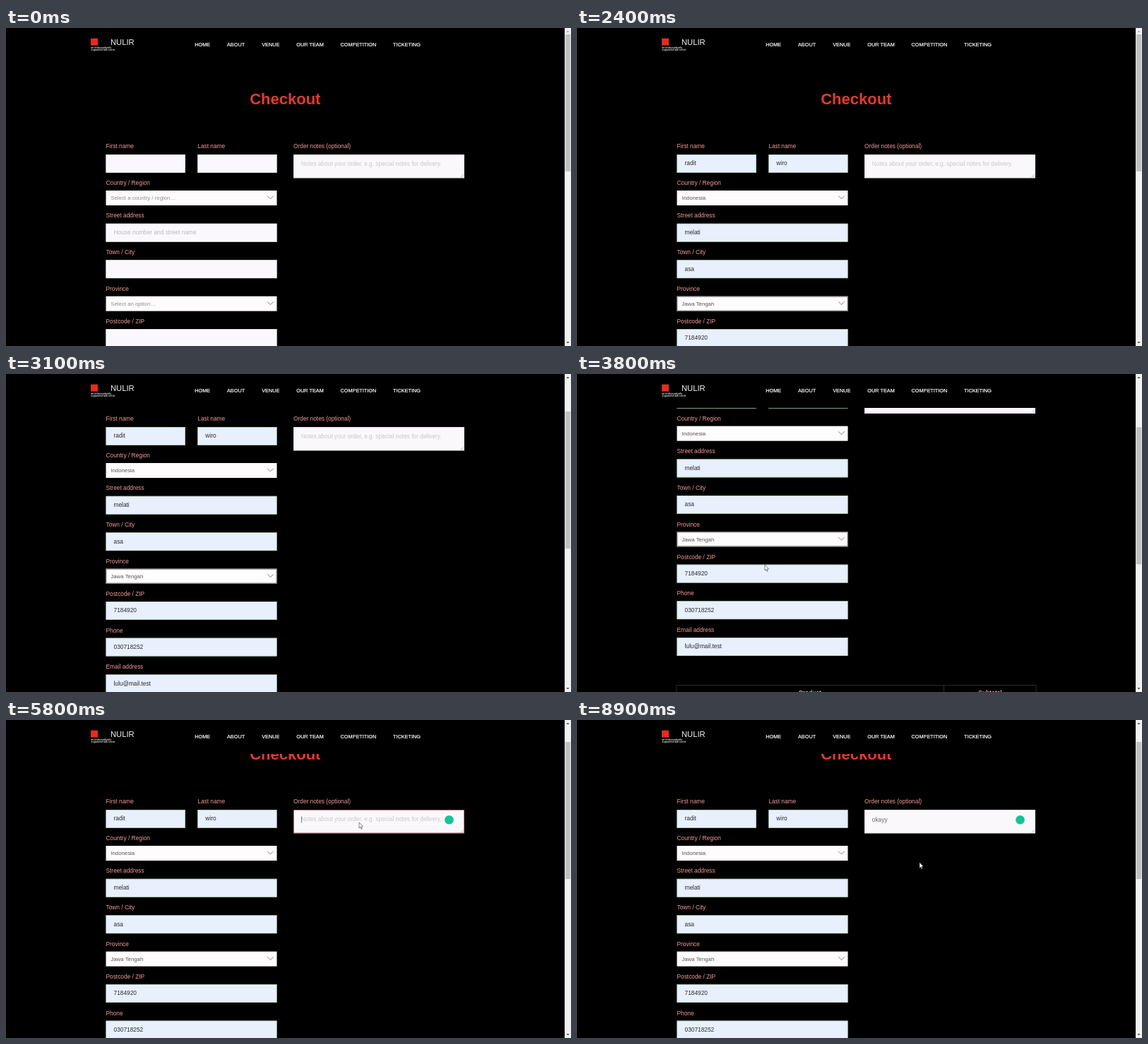
An HTML page with a canvas for the animation above (9 s loop, 800 px wide and 450 px high).

```html
<!DOCTYPE html>
<html lang="en">
<head>
<meta charset="utf-8">
<title>Checkout</title>
<style>
html, body { margin: 0; width: 100%; height: 100%; overflow: hidden; background: #000; }
canvas { display: block; width: 800px; height: 450px; }
</style>
</head>
<body>
<canvas id="stage" width="800" height="450"></canvas>
<script>
const ctx = document.getElementById('stage').getContext('2d');
const LOOP = 9000, STEP = 100;
const FILL = 1500, PROVINCE = 2100, NOTES = 5700, BLUR = 8600;
const FONT = '"Liberation Sans", Arial, sans-serif';
const PINK = '#f09a94', RED = '#e23a30';

// Wheel notches: start time and scroll position reached.
const NOTCHES = [[2550, 52], [2700, 104], [3250, 156.3], [4250, 104], [4689, 52]];
const KEYS = [6600, 6800, 7000, 7300, 7500];
const PATHS = [
  { end: 6600, points: [[3600, 262, 284], [3800, 266, 270], [4300, 330, 251], [4800, 370, 229], [5600, 500, 145]] },
  { end: LOOP, points: [[8100, 500, 145], [8500, 485, 201.5]] }
];
const NAV = [['HOME', 267.3], ['ABOUT', 313], ['VENUE', 362.2], ['OUR TEAM', 411.3],
  ['COMPETITION', 473.6], ['TICKETING', 548]];
// label, x, label centre, box top, width, value, placeholder
const FIELDS = [
  ['First name', 141.5, 167.5, 179, 112.3, 'radit', ''],
  ['Last name', 271.3, 167.5, 179, 112.2, 'wiro', ''],
  ['Street address', 141.5, 265.5, 276.8, 242, 'melati', 'House number and street name'],
  ['Town / City', 141.5, 317.2, 328.3, 242, 'asa', ''],
  ['Postcode / ZIP', 141.5, 415, 426, 242, '7184920', ''],
  ['Phone', 141.5, 466.7, 477.6, 242, '030718252', ''],
  ['Email address', 141.5, 518.5, 529.3, 242, 'lulu@mail.test', '']
];

const clamp = v => Math.max(0, Math.min(1, v));

function text(str, x, mid, size, color, weight = '', align = 'left') {
  ctx.font = `${weight} ${size}px ${FONT}`;
  ctx.textAlign = align;
  ctx.fillStyle = color;
  ctx.fillText(str, x, mid + size * 0.35);
}

function rect(x, y, w, h, color) {
  ctx.fillStyle = color;
  ctx.fillRect(x, y, w, h);
}

function frame(x, y, w, h, color, line) {
  ctx.strokeStyle = color;
  ctx.lineWidth = line;
  ctx.strokeRect(x + line / 2, y + line / 2, w - line, h - line);
}

function poly(points, color) {
  ctx.beginPath();
  points.forEach(([x, y]) => ctx.lineTo(x, y));
  ctx.closePath();
  ctx.fillStyle = color;
  ctx.fill();
}

function scrollAt(t) {
  return NOTCHES.reduce((pos, [start, to]) => {
    const p = clamp((t - start) / 200);
    return pos + (to - pos) * (1 - (1 - p) ** 3);
  }, 0);
}

function drawField([label, x, mid, top, w, value, hint], filled) {
  text(label, x, mid, 8.33, PINK);
  rect(x, top, w, 25.8, filled ? '#e8f0fe' : '#faf8fc');
  frame(x, top, w, 25.8, filled ? '#9bbd8e' : '#dfe3df', 0.6);
  const tone = filled ? '#2b2b2b' : '#bdbbbf';
  text(filled ? value : hint, x + 11, top + 12.5, 8.33, tone);
}

function drawSelect(label, mid, top, value, set, focus) {
  text(label, 141.5, mid, 8.33, PINK);
  rect(141.5, top, 242, 21, '#fefcfd');
  if (focus) frame(141, top - 0.4, 243, 21.8, '#77747a', 1.4);
  text(value, 148.3, top + 10.5, 7.8, set ? '#555' : '#8d8b8e');
  ctx.beginPath();
  ctx.moveTo(370, top + 7.6);
  ctx.lineTo(374.4, top + 12);
  ctx.lineTo(378.8, top + 7.6);
  ctx.strokeStyle = '#77757a';
  ctx.lineWidth = 0.9;
  ctx.stroke();
}

function drawNotes(t) {
  const focus = t >= NOTES && t < BLUR;
  const count = KEYS.filter(k => t >= k).length;
  text('Order notes (optional)', 407, 167.5, 8.33, PINK);
  rect(407, 179, 242, 33.3, '#faf8fb');
  frame(407, 179, 242, 33.3, focus ? '#a8453f' : '#e2dfe3', 0.7);
  ctx.beginPath();
  for (const d of [2, 4.5]) {
    ctx.moveTo(648 - d, 211.3);
    ctx.lineTo(648, 211.3 - d);
  }
  ctx.strokeStyle = '#8a888c';
  ctx.lineWidth = 0.5;
  ctx.stroke();
  if (count) text('okayy'.slice(0, count), 417.8, 193, 8.33, '#6b696d');
  else text('Notes about your order, e.g. special notes for delivery.', 417.8, 191.6, 8.33, '#c9c7cb');
  if (!focus && t < NOTES) return;
  const last = count ? KEYS[count - 1] : NOTES;
  if (focus && (t - last) % 1060 < 530) {
    ctx.font = `8.33px ${FONT}`;
    rect(418 + ctx.measureText('okayy'.slice(0, count)).width, 188.5, 0.7, 9, '#444');
  }
  ctx.beginPath();
  ctx.arc(627.5, 193.2, 6.3, 0, Math.PI * 2);
  ctx.fillStyle = '#15c39a';
  ctx.fill();
}

function drawTable() {
  frame(140.5, 596.5, 510, 40, '#333', 0.8);
  rect(519.2, 596.5, 0.8, 40, '#333');
  text('Product', 330, 607.5, 8.33, PINK, 'bold', 'center');
  text('Subtotal', 585, 607.5, 8.33, PINK, 'bold', 'center');
}

function drawPage(t) {
  const filled = t >= FILL;
  text('Checkout', 395.3, 100.3, 22, RED, 'bold', 'center');
  FIELDS.forEach(f => drawField(f, filled));
  drawSelect('Country / Region', 219.2, 230, filled ? 'Indonesia' : 'Select a country / region…', filled, false);
  drawSelect('Province', 369, 379.6, filled ? 'Jawa Tengah' : 'Select an option…', filled,
    t >= PROVINCE && t < NOTES);
  drawNotes(t);
  drawTable();
}

function drawHeader() {
  rect(0, 0, 791, 48, '#000');
  rect(120, 14.7, 10, 10, '#e62b1e');
  text('NULIR', 148, 19.6, 11.2, '#f4f4f4');
  text('an independently', 120.3, 27.3, 3.5, '#ddd', 'bold');
  text('organized talk event', 120.3, 30.8, 3.5, '#ddd', 'bold');
  NAV.forEach(([name, x]) => {
    text(name, x, 23.6, 7.29, '#fff');
    ctx.strokeStyle = '#fff';
    ctx.lineWidth = 0.2;
    ctx.strokeText(name, x, 23.6 + 7.29 * 0.35);
  });
}

function drawBar(scroll) {
  rect(791, 0, 9, 450, '#f1f1f1');
  rect(791.8, 9 + scroll * 0.424, 7.4, 194, '#c1c1c1');
  poly([[793.4, 6], [795.5, 3.8], [797.6, 6]], scroll > 0 ? '#505050' : '#a3a3a3');
  poly([[793.4, 444], [795.5, 446.2], [797.6, 444]], '#505050');
}

function drawPointer(t) {
  const path = PATHS.find(p => t >= p.points[0][0] && t < p.end);
  if (!path) return;
  let [, x, y] = path.points[0];
  path.points.slice(1).forEach(([time, px, py], i) => {
    const start = path.points[i][0];
    const p = clamp((t - start) / (time - start));
    x += (px - x) * p;
    y += (py - y) * p;
  });
  const arrow = [[0, 0], [0, 8], [1.8, 6.4], [3, 9.4], [4.2, 8.8], [3, 6], [5.4, 5.8]];
  poly(arrow.map(([dx, dy]) => [x + dx, y + dy]), '#fff');
  ctx.strokeStyle = '#333';
  ctx.lineWidth = 0.6;
  ctx.stroke();
}

function draw(t) {
  const scroll = scrollAt(t);
  rect(0, 0, 800, 450, '#000');
  ctx.save();
  ctx.translate(0, -scroll);
  drawPage(t);
  ctx.restore();
  drawHeader();
  drawBar(scroll);
  drawPointer(t);
}

const begin = performance.now();
function tick() {
  const t = (performance.now() - begin) % LOOP;
  draw(Math.floor(t / STEP) * STEP);
  requestAnimationFrame(tick);
}
tick();
</script>
</body>
</html>
```
